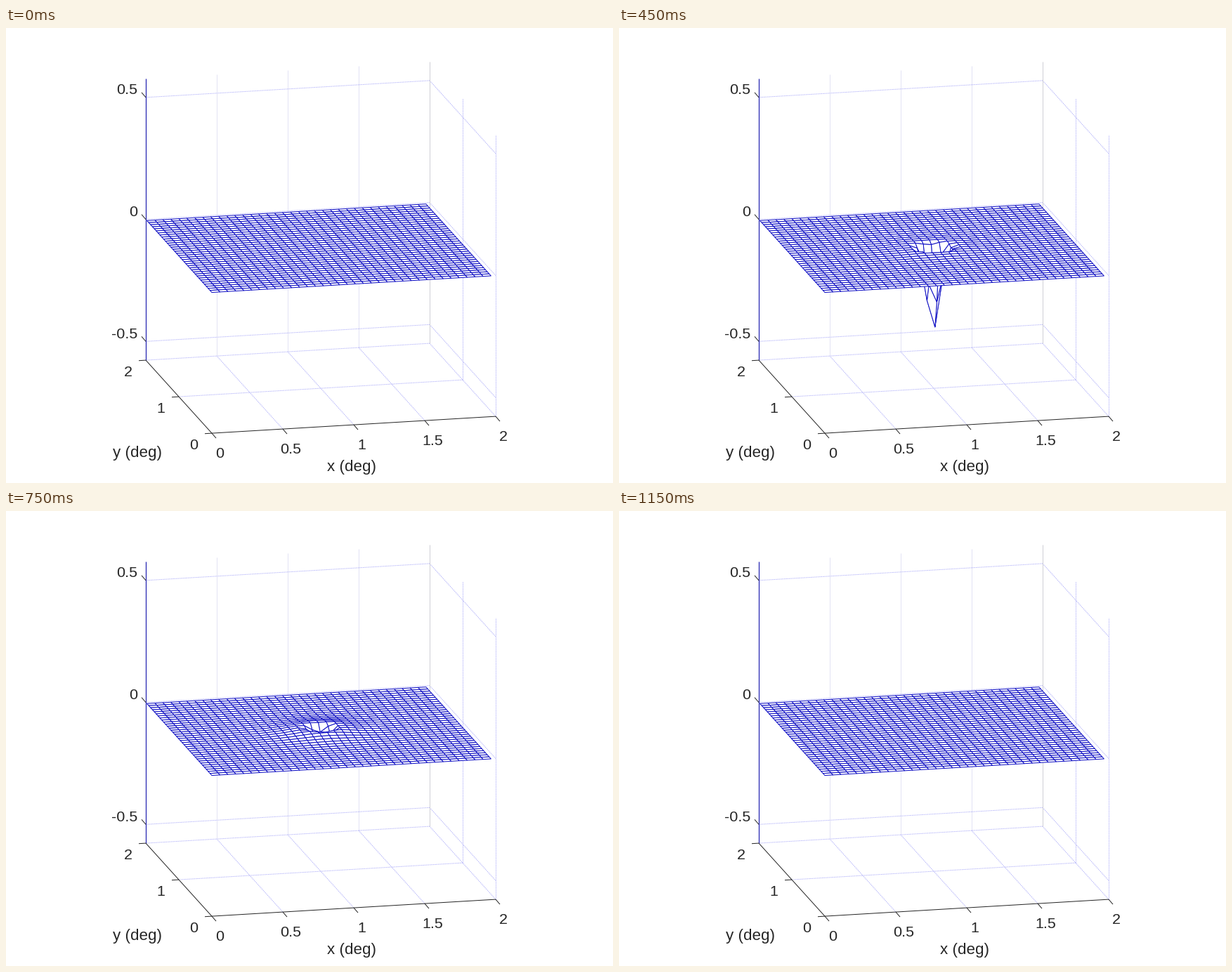
A matplotlib script that plays this animation: 864x648 px, repeating every 3000 ms.

```python
import numpy as np
import matplotlib.pyplot as plt
from matplotlib.animation import FuncAnimation
from matplotlib.collections import LineCollection, PolyCollection

W, H, DPI = 864, 648, 100
PX = 72 / DPI
FRAMES, STEP_MS = 60, 50
ZLIM = 0.577

INK, BLUE = "#262626", "#1010c4"
plt.rcParams["font.family"] = "Liberation Sans"


def project(x, y, z):
    """Oblique view of the plot box, in stage pixels."""
    return np.stack([293 + 202 * x - 47 * y,
                     376.6 - 12 * x - 52 * y - 347.5 * z], axis=-1)


fig = plt.figure(figsize=(W / DPI, H / DPI), dpi=DPI, facecolor="white")
ax = fig.add_axes([0, 0, 1, 1])
ax.set(xlim=(0, W), ylim=(H, 0))
ax.axis("off")


def lines(segments, color, style="solid", width=1.0, z=1):
    ax.add_collection(LineCollection(segments, colors=color, linestyles=style,
                                     linewidths=width * PX, zorder=z))


def seg(a, b):
    return [project(*a), project(*b)]


# Grid on the back wall, the right wall and the floor
walls, dots = [], []
for x in (0.5, 1, 1.5):
    walls.append(seg((x, 2, -ZLIM), (x, 2, ZLIM)))
    dots.append(seg((x, 0, -ZLIM), (x, 2, -ZLIM)))
for y in (0, 1):
    dots.append(seg((2, y, -ZLIM), (2, y, ZLIM)))
for y in (1, 2):
    dots.append(seg((0, y, -ZLIM), (2, y, -ZLIM)))
dots.append(seg((2, 0, -ZLIM), (2, 2, -ZLIM)))
for z in (-0.5, 0, 0.5):
    dots.append(seg((0, 2, z), (2, 2, z)))
    dots.append(seg((2, 2, z), (2, 0, z)))
lines(walls, "#e2e2f4")
lines(dots, "#b4b4fa", (0, (1.4, 1.0)))
lines([seg((2, 2, -ZLIM), (2, 2, ZLIM))], "#cfcfd6")

# Axes and ticks
lines([seg((0, 2, -ZLIM), (0, 2, ZLIM))], "#2020b0", width=1.2, z=2)
lines([seg((0, 0, -ZLIM), (2, 0, -ZLIM)),
       seg((0, 0, -ZLIM), (0, 2, -ZLIM))], INK, z=2)


def tick(point, dx, dy):
    p = project(*point)
    lines([[p, p + (dx, dy)]], INK, z=2)


def label(x, y, text, size=21.5, ha="center"):
    ax.text(x, y, text, fontsize=size * PX, color=INK, ha=ha,
            va="center_baseline", zorder=3)


for i, text in enumerate(["0", "0.5", "1", "1.5", "2"]):
    tick((i / 2, 0, -ZLIM), 6, 7)
    label(304.5 + 100.8 * i, 605 - 6 * i, text)
for i, text in enumerate(["0", "1", "2"]):
    tick((0, i, -ZLIM), -10, 0.6)
    label(267.5 - 46.7 * i, 592 - 52 * i, text)
for i, text in enumerate(["-0.5", "0", "0.5"]):
    tick((0, 2, (i - 1) / 2), -6, -7)
    label(187, 434.5 - 174 * i, text, ha="right")
label(492, 623, "x (deg)", 22.4)
label(187, 603, "y (deg)", 22.4)

# Difference-of-Gaussians receptive field, with a slightly late surround
N = 36
axis = np.linspace(0, 1.967, N)
X, Y = np.meshgrid(axis, axis)
R2 = (X - 1) ** 2 + (Y - 1) ** 2
CENTER = 0.737 * np.exp(-R2 / (2 * 0.048 ** 2))
SURROUND = 0.101 * np.exp(-R2 / (2 * 0.18 ** 2))


def pulse(t, peak, n):
    u = max(t, 1e-6) / peak
    return np.exp(n * (np.log(u) + 1 - u))


def response(t):
    return 1.23 * pulse(t, 6.6, 25) - 0.87 * pulse(t, 9.9, 18)


def faces(i):
    z = CENTER * response(i) - SURROUND * response(i - 0.7)
    p = project(X, Y, z)
    quads = np.stack([p[:-1, :-1], p[:-1, 1:], p[1:, 1:], p[1:, :-1]], axis=2)
    return quads[::-1, ::-1].reshape(-1, 4, 2)  # far to near


mesh = PolyCollection(faces(0), facecolors="white", edgecolors=BLUE,
                      linewidths=1.0 * PX, zorder=4)
ax.add_collection(mesh)


def draw(i):
    mesh.set_verts(faces(i))
    return [mesh]


anim = FuncAnimation(fig, draw, frames=FRAMES, interval=STEP_MS,
                     repeat=True, repeat_delay=0, blit=False)
plt.show()
```
